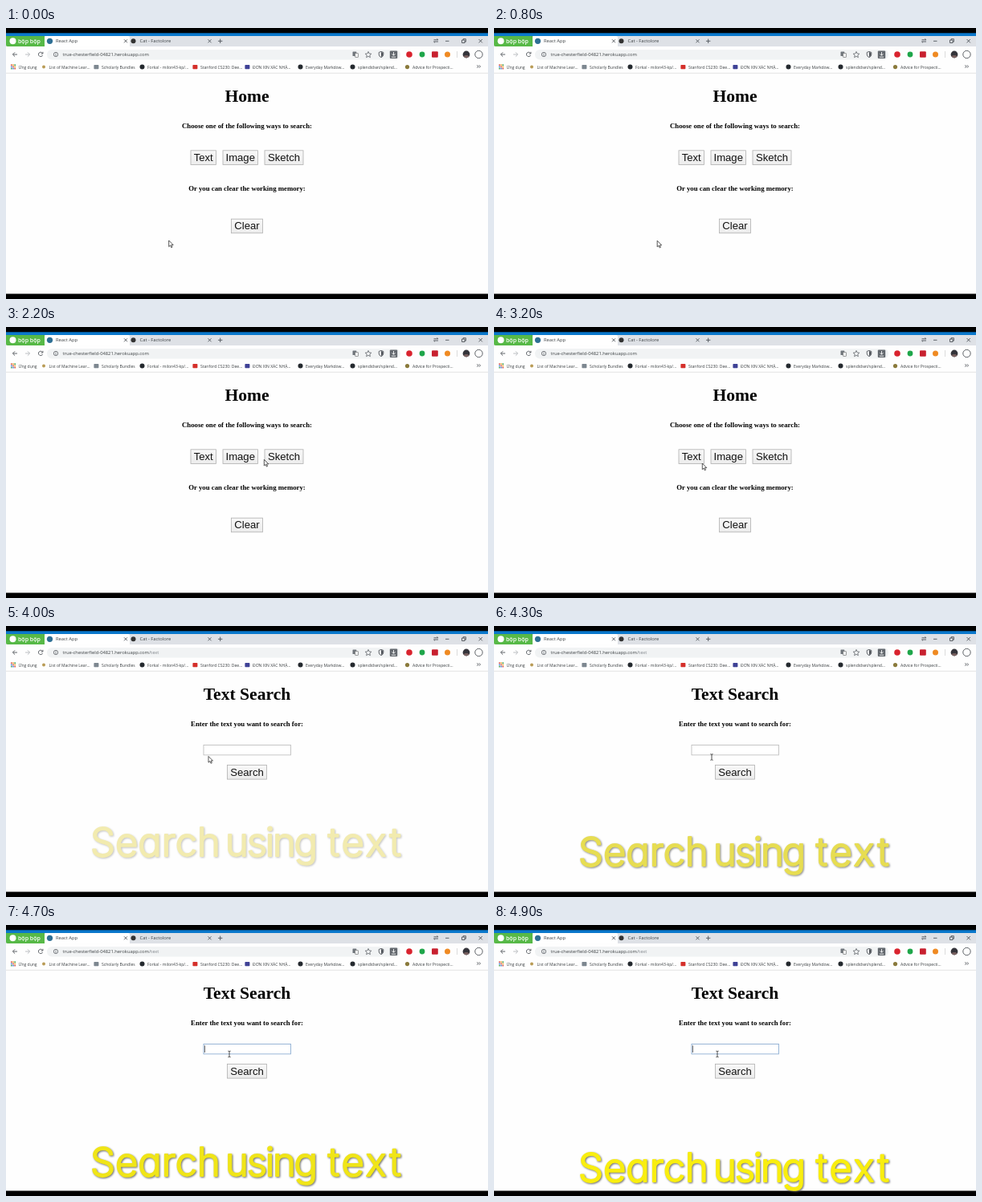
An HTML page that plays this animation: 600x338 px, repeating every 5000 ms.

```html
<!DOCTYPE html>
<html lang="en">
<head>
<meta charset="utf-8">
<title>Search demo</title>
<style>
  html, body { margin: 0; width: 100%; height: 100%; overflow: hidden; background: #fff; }
  svg { display: block; width: 100vw; height: 100vh; }
  .ui { font-family: "Open Sans", "Noto Sans", sans-serif; font-size: 5.8px; fill: #3c4043; }
  .marks { font-size: 5.05px; }
  .line { fill: none; stroke: #50545a; stroke-width: .9; }
  .page { font-family: "Liberation Serif", serif; font-weight: bold; font-size: 8.75px; text-anchor: middle; fill: #000; }
  .page .title { font-size: 21.6px; }
  .page .label { font: 13.1px "Liberation Sans", sans-serif; fill: #111; }
  .button { fill: url(#face); stroke: #b0b0b0; stroke-width: .8; }
  #caption { font-family: "Comic Sans MS", Inter, sans-serif; font-size: 49px; font-weight: 300;
    font-feature-settings: "cv11"; stroke-width: 1.9; stroke-linejoin: round;
    filter: drop-shadow(1.2px 1.4px 1px #555d); }
</style>
</head>
<body>
<svg id="stage" viewBox="0 0 600 338" preserveAspectRatio="none">
  <defs>
    <linearGradient id="face" x2="0" y2="1">
      <stop stop-color="#f8f8f8"/><stop offset="1" stop-color="#ececec"/>
    </linearGradient>
  </defs>
  <rect width="600" height="338" fill="#fefefe"/>
  <rect width="600" height="7" fill="#000"/>
  <rect y="6.3" width="600" height="3.7" fill="#0a78cc"/>
  <rect y="10" width="600" height="13" fill="#dee1e6"/>
  <rect y="331.5" width="600" height="6.5" fill="#000"/>

  <g id="tabs" class="ui">
    <path d="M0 10H48V23H2Q0 23 0 21Z" fill="#57b947"/>
    <circle cx="8.5" cy="16.2" r="4" fill="#fff"/>
    <text x="15" y="18.8" font-weight="600" style="fill:#fff;font-size:7px">bộp bộp</text>
    <path d="M48 23V12Q48 10 50 10H152Q154 10 154 12V23Z" fill="#fff"/>
    <circle cx="54.5" cy="16.3" r="3.6" fill="#2e6f94"/>
    <text x="62" y="18.4">React App</text>
    <circle cx="158.5" cy="16.3" r="3" fill="#333"/>
    <text x="166.5" y="18.4">Cat - Factolore</text>
    <path class="line" d="M147 14.3l4 4m0-4l-4 4M251.500 14.300l4 4m0-4l-4 4M264 16.300h5.400m-2.700-2.700v5.400"/>
    <path class="line" d="M532.500 14.800h5.500m-1.500-1.300l1.500 1.300M538 17h-5.500m1.500 1.300l-1.500-1.300M547 16.300h4.500M567.500 15h3.500v3.500h-3.500ZM569 15v-1.300h3.400v3.500H571M588.500 14l4.400 4.400m0-4.400L588.500 18.400"/>
  </g>

  <g id="toolbar" class="ui">
    <rect x="51" y="27" width="440" height="12.500" rx="6.200" fill="#f1f3f4"/>
    <path class="line" d="M14 33H8.500m2.600-2.700L8.400 33l2.700 2.700"/>
    <path class="line" d="M24 33h5.500m-2.600-2.700l2.700 2.700l-2.700 2.700" style="stroke:#b4b7ba"/>
    <path class="line" d="M45.300 31.300A2.700 2.700 0 1 0 45.600 34M45.900 29.800v2.300h-2.300"/>
    <circle class="line" cx="62" cy="33" r="2.700" style="stroke-width:.7"/>
    <path class="line" d="M62 32.700v1.900M62 31.200v.7" style="stroke-width:.8"/>
    <text x="70.500" y="35.200">true-chesterfield-04821.herokuapp.com<tspan id="route" fill="#80868b">/text</tspan></text>
    <rect x="431.500" y="29.500" width="4.800" height="5.500" rx=".6" fill="#6f757b"/>
    <rect x="434.500" y="31.500" width="4" height="5" rx=".6" fill="#f1f3f4" stroke="#777" stroke-width=".7"/>
    <path class="line" d="M451 29.400l1.100 2.500l2.700.3l-2 1.800l.6 2.700l-2.400-1.400l-2.400 1.400l.6-2.700l-2-1.800l2.700-.3Z" style="stroke-width:.7"/>
    <path class="line" d="M467 29.400l2.800 1v2.600q0 2.500-2.800 3.700q-2.800-1.200-2.800-3.700v-2.600Z"/>
    <path d="M467 30v6.200q2.300-1.100 2.300-3.400v-2Z" fill="#50545a"/>
    <rect x="477.800" y="28.500" width="9.400" height="9.400" rx="1" fill="#62676d"/>
    <path class="line" d="M482.500 30v4m-2-1.700l2 2l2-2M479.800 36.200h5.400" style="stroke:#fff"/>
    <circle cx="502" cy="33" r="3.800" fill="#d9232e"/>
    <circle cx="518" cy="33" r="3.400" fill="#1fa64a"/>
    <rect x="530" y="29.300" width="7.800" height="7.400" rx="1" fill="#c8202f"/>
    <circle cx="549.500" cy="33" r="3.500" fill="#ef8a22"/>
    <path d="M561.500 29v8" stroke="#ccc" stroke-width=".7"/>
    <circle cx="573" cy="33" r="4.400" fill="#34343a"/>
    <path d="M569.300 35.300A4.400 4.400 0 0 0 576.700 35.300Q573 32.800 569.300 35.300Z" fill="#79605f"/>
    <circle class="line" cx="588.500" cy="33" r="4.700"/>
  </g>

  <g id="bookmarks" class="ui marks"></g>
  <path d="M0 56.300H600" stroke="#dcdcdc" stroke-width=".8"/>

  <g id="home" class="page"></g>
  <g id="search" class="page">
    <rect id="field" x="246" y="148.500" width="108.500" height="12.400" fill="#fff" stroke-width=".8"/>
    <path id="caret" d="M247.400 150.300v8.700" stroke="#333" stroke-width=".8"/>
  </g>

  <text id="caption"><tspan x="105">Search</tspan><tspan x="273" letter-spacing="-2.200">using</tspan><tspan x="400.500" letter-spacing="2.800">text</tspan></text>

  <path id="arrow" d="M0 0V7.700L1.800 6.100L3 8.800L4.300 8.200L3.100 5.600H5.500Z" fill="#fff" stroke="#222" stroke-width=".75"/>
  <path id="beam" d="M-1.600-3.800Q0-3.800 0-3Q0-3.800 1.600-3.800M0-3V3M-1.600 3.800Q0 3.800 0 3Q0 3.800 1.600 3.800" fill="none" stroke="#222" stroke-width=".8"/>
</svg>
<script>
const LOOP = 5000, STEP = 100;
const NS = "http://www.w3.org/2000/svg";
const $ = id => document.getElementById(id);

function add(parent, tag, attrs, text = "") {
  const node = document.createElementNS(NS, tag);
  for (const key in attrs) node.setAttribute(key, attrs[key]);
  node.textContent = text;
  return parent.appendChild(node);
}

function heading(parent, y, text, cls = "") {
  add(parent, "text", { x: 300, y, class: cls }, text);
}

function button(parent, x, y, width, label) {
  add(parent, "rect", { x, y, width, height: 17.6, class: "button" });
  add(parent, "text", { x: x + width / 2, y: y + 13.1, class: "label" }, label);
}

function buildBookmarks() {
  const bar = $("bookmarks");
  const appColors = ["#d94a3d", "#e6a52b", "#3d9c57", "#4478d0"];
  for (let i = 0; i < 9; i++) {
    add(bar, "rect", { x: 6 + i % 3 * 2.2, y: 45.4 + Math.floor(i / 3) * 2.2, width: 1.6, height: 1.6, fill: appColors[i % 4] });
  }
  add(bar, "text", { x: 15.5, y: 50.7 }, "Ứng dụng");
  const links = [
    [53.5, "List of Machine Lear...", "#b99b55", 2],
    [119, "Scholarly Bundles", "#7d8790", 0],
    [176, "Forkal - milon43-kp/...", "#24292e", 3],
    [242, "Stanford CS230: Dee...", "#d5302b", 0],
    [307, "ĐƠN XIN XÁC NHẬ...", "#3f4296", 0],
    [373, "Everyday Markdow...", "#24292e", 3],
    [438, "splendidset/splend...", "#24292e", 3],
    [506, "Advice for Prospecti...", "#8a7a3c", 2.6]
  ];
  for (const [x, label, fill, r] of links) {
    if (r) add(bar, "circle", { cx: x - 6.5, cy: 48.6, r, fill });
    else add(bar, "rect", { x: x - 9.6, y: 45.9, width: 6, height: 5.4, rx: .8, fill });
    add(bar, "text", { x, y: 50.7 }, label);
  }
  add(bar, "path", { class: "line", d: "M586.5 46.3l1.6 1.7l-1.6 1.7m2.4-3.4l1.6 1.7l-1.6 1.7" });
}

function buildPages() {
  const home = $("home"), search = $("search");
  heading(home, 92, "Home", "title");
  heading(home, 125.2, "Choose one of the following ways to search:");
  button(home, 230, 152.8, 31.5, "Text");
  button(home, 270, 152.8, 43.5, "Image");
  button(home, 322, 152.8, 48, "Sketch");
  heading(home, 202.8, "Or you can clear the working memory:");
  button(home, 280.5, 238.2, 39, "Clear");
  heading(search, 92, "Text Search", "title");
  heading(search, 125.2, "Enter the text you want to search for:");
  button(search, 275.5, 173.5, 49, "Search");
}

// Keys are [time, ...values], blended linearly.
function blend(keys, t) {
  const next = keys.findIndex(key => key[0] > t);
  if (next === 0) return keys[0].slice(1);
  if (next < 0) return keys[keys.length - 1].slice(1);
  const a = keys[next - 1], b = keys[next];
  const k = (t - a[0]) / (b[0] - a[0]);
  return a.slice(1).map((v, i) => v + (b[i + 1] - v) * k);
}

const pointerKeys = [
  [0, 202.7, 265], [800, 203.2, 265.3], [1200, 220, 248], [1400, 224, 243],
  [1700, 268, 205], [1900, 283, 196], [2200, 321.3, 165.3], [2400, 320, 167],
  [2700, 289, 176], [2900, 286, 176], [3200, 259.3, 170], [3400, 254, 166.5],
  [3700, 252, 162.5], [4000, 252, 162.5], [4300, 271, 163.5], [4500, 277.5, 164.5],
  [4700, 278, 161], [5000, 278, 161]
];
// time, baseline, opacity, red, green, blue
const captionKeys = [
  [4000, 287, .4, 226, 208, 60], [4300, 298.5, .8, 226, 214, 40],
  [4500, 306, 1, 230, 220, 32], [4900, 320, 1, 249, 238, 16]
];

const show = (id, on) => $(id).setAttribute("visibility", on ? "visible" : "hidden");

function draw(time) {
  const t = Math.floor(time % LOOP / STEP) * STEP;
  const searching = t >= 4000, focused = t >= 4700, overField = t >= 4300;

  show("home", !searching);
  show("search", searching);
  show("route", searching);
  show("caption", searching);
  show("caret", focused);
  $("field").setAttribute("stroke", focused ? "#7fa3cc" : "#b8b8b8");

  const [x, y] = blend(pointerKeys, t);
  show("arrow", !overField);
  show("beam", overField);
  for (const id of ["arrow", "beam"]) $(id).setAttribute("transform", `translate(${x} ${y})`);

  const [baseline, opacity, ...rgb] = blend(captionKeys, t);
  const caption = $("caption"), color = `rgb(${rgb.map(Math.round)})`;
  caption.setAttribute("y", baseline);
  caption.setAttribute("opacity", opacity);
  caption.setAttribute("fill", color);
  caption.setAttribute("stroke", color);
}

buildBookmarks();
buildPages();
const start = performance.now();
function tick() {
  draw(performance.now() - start);
  requestAnimationFrame(tick);
}
tick();
</script>
</body>
</html>
```
